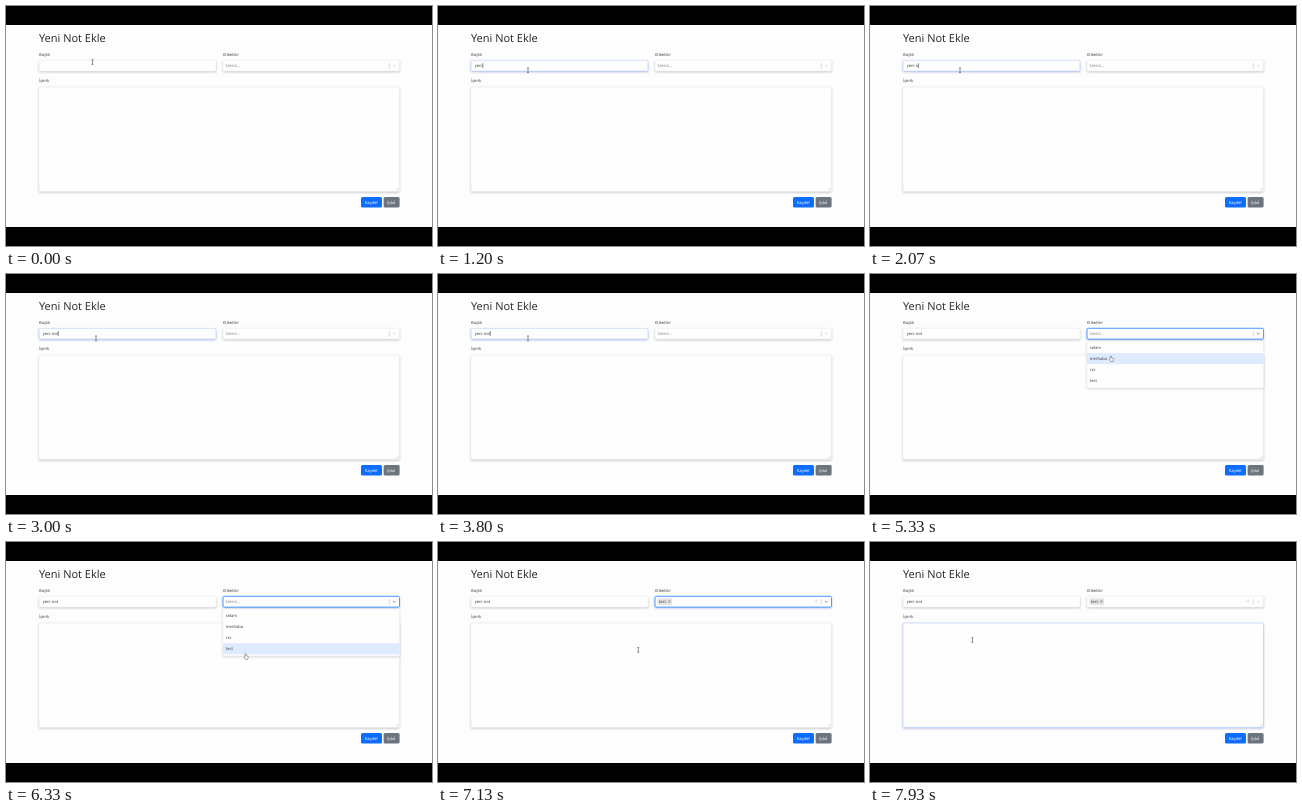
An HTML page that plays this animation: 426x240 px, repeating every 8000 ms.

```html
<!DOCTYPE html>
<html lang="tr">
<head>
<meta charset="utf-8">
<title>Yeni Not Ekle</title>
<style>
  html, body { margin: 0; width: 100%; height: 100%; overflow: hidden; background: #000; }
  svg { display: block; width: 100vw; height: 100vh; }
  text { font: 4.1px "Open Sans", "Noto Sans", sans-serif; fill: #33373c; white-space: pre; text-rendering: geometricPrecision; }
  .title { font-size: 11px; font-weight: 500; fill: #212529; }
  .hint { fill: #808080; }
  .button { fill: #fff; }
  .field { fill: #fefefe; stroke: #e6e8f2; stroke-width: .5; filter: drop-shadow(0 1px .8px #0003); }
  .field.focus { stroke: #a4c2f7; filter: drop-shadow(0 1px .9px #6478c866); }
  #select.focus { stroke: #2684ff; stroke-width: .8; }
  .icon { fill: none; stroke: #bfc2c6; stroke-width: .6; }
  .icon.dark { stroke: #555; }
  #menu > rect:first-child { fill: #fefefe; stroke: #e4e6ea; stroke-width: .4; filter: drop-shadow(0 1px 1px #0002); }
  #hover { fill: #deebff; }
  #ibeam { fill: none; stroke: #444; stroke-width: .6; }
  #hand { fill: #fff; stroke: #333; stroke-width: .45; }
</style>
</head>
<body>
<svg viewBox="0 0 426 240" preserveAspectRatio="none">
  <rect width="426" height="240"/>
  <rect y="19" width="426" height="202" fill="#fdfdfd"/>

  <text class="title" x="33" y="36.2">Yeni Not Ekle</text>
  <text x="33" y="50.3">Başlık</text>
  <text x="217" y="50.3">Etiketler</text>
  <text x="33" y="76.4">İçerik</text>

  <rect class="field" id="input" x="33" y="54.3" width="177" height="10.8" rx="1.5"/>
  <text id="typed" x="36.7" y="61.2"></text>
  <path id="caret" d="M0 57.2v5" stroke="#222" stroke-width=".5"/>

  <rect class="field" id="select" x="217" y="54.3" width="176.5" height="10.8" rx="1.2"/>
  <text class="hint" id="hint" x="219.6" y="61.2">Select...</text>
  <g id="tag">
    <rect x="219.5" y="56.3" width="14.5" height="6.6" rx=".6" fill="#e4e4e4"/>
    <text x="220.8" y="61">test</text>
    <path class="icon dark" d="M230.3 58.5l2 2m0-2l-2 2"/>
    <path class="icon" d="M376.8 58.3l2.4 2.4m0-2.4l-2.4 2.4"/>
  </g>
  <path class="icon" d="M383.3 56.8v5.8"/>
  <path class="icon" id="chevron" d="M386.8 58.8l1.5 1.5 1.5-1.5"/>

  <rect class="field" id="area" x="33" y="81" width="360.5" height="104.5" rx="1.5"/>
  <path class="icon" d="M390 184.5l2.5-2.5m-1 2.5l1-1"/>

  <rect x="355" y="191" width="21" height="10.4" rx="1.5" fill="#0d6efd"/>
  <text class="button" x="358.7" y="197.7">Kaydet</text>
  <rect x="377.6" y="191" width="16" height="10.4" rx="1.5" fill="#6c757d"/>
  <text class="button" x="381" y="197.7">İptal</text>

  <g id="menu">
    <rect x="216.7" y="67" width="177" height="47" rx="1"/>
    <rect id="hover" x="216.7" width="177" height="11.1"/>
    <text x="219.7" y="75.1">selam</text>
    <text x="219.7" y="86.2">merhaba</text>
    <text x="219.7" y="97.3">ccc</text>
    <text x="219.7" y="108.4">test</text>
  </g>

  <g id="mouse">
    <path id="ibeam" d="M-.9-2.4h1.8M0-2.4v4.8M-.9 2.4h1.8"/>
    <path id="hand" d="M0 0q.8 0 .8.8v1.2l1.6.5q.5.3.4 1l-.5 1.9h-2.5L-1.3 3.5q0-.6.6-.4V.8Q-.7 0 0 0z"/>
  </g>
</svg>
<script>
  const LOOP = 8000, STEP = 1000 / 15;
  const ROW_TOP = 68, ROW_HEIGHT = 11.1;
  const PHRASE = "yeni not";
  const KEYS = [480, 660, 850, 1040, 1750, 1980, 2250, 2600];
  const FOCUS_INPUT = 330, OPEN = 4600, PICK = 6730, FOCUS_AREA = 7600;
  // time, x, y
  const PATH = [
    [0, 86.5, 56], [200, 86.5, 57], [600, 90, 64.3], [4000, 90, 64.3],
    [4500, 258, 60], [4700, 256, 60], [5050, 243, 74], [5300, 240.7, 82.5],
    [5550, 240.7, 83], [6000, 240, 97], [6250, 239.5, 111.8],
    [6830, 239.5, 111.8], [7500, 102.5, 98], [LOOP, 102.5, 98]
  ];

  const el = id => document.getElementById(id);
  const show = (id, on) => el(id).style.display = on ? "" : "none";
  const focus = (id, on) => el(id).classList.toggle("focus", on);
  const ease = u => u * u * (3 - 2 * u);

  function mouseAt(t) {
    const i = PATH.findIndex(p => p[0] > t);
    const [t0, x0, y0] = PATH[i - 1], [t1, x1, y1] = PATH[i];
    const u = ease((t - t0) / (t1 - t0));
    return [x0 + (x1 - x0) * u, y0 + (y1 - y0) * u];
  }

  function draw(t) {
    const [x, y] = mouseAt(t);
    const open = t >= OPEN && t < PICK;
    const typing = t >= FOCUS_INPUT && t < OPEN;
    const count = KEYS.filter(k => k <= t).length;

    el("typed").textContent = PHRASE.slice(0, count);
    const caretX = 36.9 + (count ? el("typed").getComputedTextLength() : 0);
    el("caret").setAttribute("transform", `translate(${caretX})`);
    const lastKey = count ? KEYS[count - 1] : FOCUS_INPUT;
    show("caret", typing && (t - lastKey) % 1060 < 530);

    focus("input", typing);
    focus("select", t >= OPEN && t < FOCUS_AREA);
    focus("area", t >= FOCUS_AREA);
    el("chevron").classList.toggle("dark", t >= OPEN && t < FOCUS_AREA);

    show("menu", open);
    show("hint", t < PICK);
    show("tag", t >= PICK);
    const row = Math.max(0, Math.min(3, Math.floor((y - ROW_TOP) / ROW_HEIGHT)));
    el("hover").setAttribute("y", ROW_TOP + row * ROW_HEIGHT);

    const onMenu = open && y > ROW_TOP;
    show("hand", onMenu);
    show("ibeam", !onMenu);
    el("mouse").setAttribute("transform", `translate(${x} ${y})`);
  }

  function tick() {
    const t = performance.now() % LOOP;
    draw(Math.floor(t / STEP) * STEP);
    requestAnimationFrame(tick);
  }
  tick();
</script>
</body>
</html>
```
